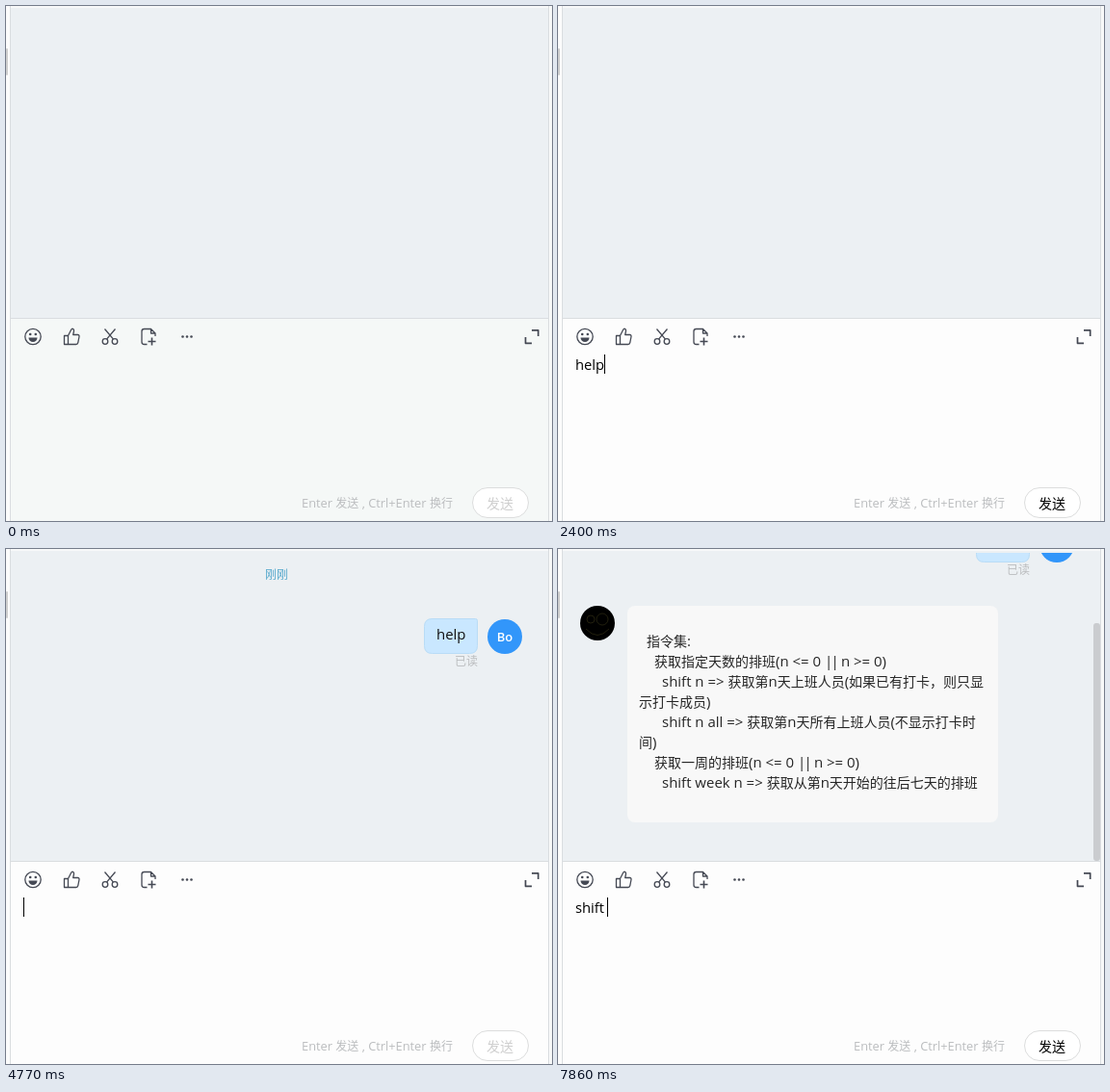
Recreate the animation shown at these times as an HTML page. Size 567 by 535 pixels, loop 8 s.

```html
<!DOCTYPE html>
<html lang="zh-CN">
<head>
<meta charset="utf-8">
<title>Chat</title>
<style>
html, body { margin: 0; width: 100%; height: 100%; overflow: hidden; background: #f8f9f9; }
svg { display: block; width: 567px; height: 535px; }
text { font: 14px "Open Sans", "Noto Sans CJK SC", "Noto Sans CJK", sans-serif; white-space: pre; fill: #111; }
.latin { font-size: 1.07em; }
#input .latin { font-size: 1.055em; }
#reply text { fill: #262626; }
.bars { letter-spacing: -1.7px; }
.small { font-size: 12px; fill: #bbbdbf; }
.icons { fill: none; stroke: #454954; stroke-width: 1.3; stroke-linejoin: round; }
.icons .solid { fill: #454954; stroke: none; }
</style>
</head>
<body>
<svg viewBox="0 0 567 535">
  <defs><clipPath id="view"><rect x="5" y="4" width="558" height="320"/></clipPath></defs>

  <rect width="4" height="535" fill="#fcfcfc"/>
  <rect y="44" width="2" height="28" rx="1" fill="#cfcfcf"/>
  <rect x="5" y="2" width="558" height="322" fill="#ecf0f3"/>
  <rect id="editor" x="5" y="325" width="558" height="210"/>
  <path d="M4.5 0V535M563.5 0V535M5 324.5H563" fill="none" stroke="#dadde0"/>

  <g clip-path="url(#view)">
    <g id="sent">
      <text class="small" x="269" y="31" style="fill:#55a8cc">刚刚</text>
      <path d="M442 72.5H487.5q2 0 2 2V100.5q0 8-8 8H442.5q-8 0-8-8V80.5q0-8 8-8z" fill="#c9e7ff" stroke="#b9dcf6"/>
      <text x="447" y="94" data-mixed>help</text>
      <circle cx="518" cy="91" r="18" fill="#3296fa"/>
      <text x="518" y="95.5" text-anchor="middle" style="font-size:13px;font-weight:600;fill:#fff">Bo</text>
      <text class="small" id="status" x="466" y="120.5"></text>
    </g>
    <g id="reply">
      <circle cx="41" cy="77" r="18" fill="#000"/>
      <g fill="none" stroke="#2a2812" stroke-width=".8">
        <circle cx="34" cy="73" r="4"/><circle cx="46" cy="73" r="6"/><path d="M29 83q12 13 24 0"/>
      </g>
      <rect x="72" y="59" width="385" height="225" rx="8" fill="#f8f8f8"/>
      <rect x="556" y="77" width="7" height="247" rx="3" fill="#cacccf"/>
    </g>
  </g>

  <g class="icons">
    <circle cx="28" cy="343.5" r="8.2"/>
    <path class="solid" d="M23.5 344.5h9a4.5 4.5 0 0 1-9 0z"/>
    <circle class="solid" cx="25.2" cy="341" r="1.3"/><circle class="solid" cx="30.8" cy="341" r="1.3"/>
    <path d="M60.5 342.5h4v9h-4zM64.5 342.5l3.2-6.3q.8-1.5 2.1-.6 1 .8.7 2.3l-.8 3.6h4.800q1.8.2 1.5 2l-1.2 6.2q-.3 1.8-2 1.8h-8.3"/>
    <path d="M102.5 335.5l9 10.7M113.5 335.5l-9 10.7"/>
    <circle cx="103" cy="348.5" r="2.8"/><circle cx="113" cy="348.5" r="2.8"/>
    <path d="M146.5 351.5h-3q-2.5 0-2.5-2.5v-11q0-2.5 2.5-2.5h7l4.5 4.5v3M150.5 335.5v4.5h4.5"/>
    <path d="M147.5 348.5h8M151.5 344.5v8" stroke-width="1.6"/>
    <circle class="solid" cx="183.5" cy="343.5" r="1.3"/><circle class="solid" cx="188" cy="343.5" r="1.3"/><circle class="solid" cx="192.5" cy="343.5" r="1.3"/>
    <path d="M546 336.8h6.7v6.2M539.5 344v6.3h6.5" stroke-width="1.7"/>
  </g>

  <text id="input" x="18" y="378" style="fill:#000"></text>
  <rect id="caret" y="362" width="1" height="20"/>
  <text class="small" x="307" y="520.5" data-mixed>Enter 发送 , Ctrl+Enter 换行</text>
  <rect x="484.5" y="500.5" width="58" height="31" rx="15.5" fill="#fff" stroke="#dcdddd"/>
  <text id="send" x="499" y="522">发送</text>
</svg>
<script>
const LOOP = 8000;
const $ = id => document.getElementById(id);
const NS = 'http://www.w3.org/2000/svg';

// Latin runs are set slightly larger than the Chinese around them.
function setText(el, str) {
  el.textContent = '';
  for (const run of str.match(/\|\||[\x20-\x7b\x7d\x7e]+|[^\x20-\x7e]+/g) || []) {
    const span = document.createElementNS(NS, 'tspan');
    span.textContent = run;
    if (run.charCodeAt(0) < 127) span.classList.add('latin');
    if (run === '||') span.classList.add('bars');
    el.append(span);
  }
}

document.querySelectorAll('[data-mixed]').forEach(el => setText(el, el.textContent));

[
  [92, '指令集:'],
  [100, '获取指定天数的排班(n <= 0 || n >= 0)'],
  [108, 'shift n => 获取第n天上班人员(如果已有打卡，则只显'],
  [84, '示打卡成员)'],
  [108, 'shift n all => 获取第n天所有上班人员(不显示打卡时'],
  [84, '间)'],
  [100, '获取一周的排班(n <= 0 || n >= 0)'],
  [108, 'shift week n => 获取从第n天开始的往后七天的排班']
].forEach(([x, str], i) => {
  const line = document.createElementNS(NS, 'text');
  line.setAttribute('x', x);
  line.setAttribute('y', 101 + 21 * i);
  setText(line, str);
  $('reply').append(line);
});

const words = [
  { text: 'help', keys: [2010, 2130, 2220, 2400], end: 2610 },
  { text: 'shift ', keys: [7200, 7320, 7380, 7560, 7710, 7860], end: LOOP }
];

function typedAt(t) {
  const word = words.find(w => t >= w.keys[0] && t < w.end);
  return word ? word.text.slice(0, word.keys.filter(k => k <= t).length) : '';
}

const show = (id, on) => $(id).setAttribute('visibility', on ? 'visible' : 'hidden');
let shown = null;

function draw(t) {
  const typed = typedAt(t);
  if (typed !== shown) {
    setText($('input'), typed);
    const width = typed ? $('input').getComputedTextLength() : 0;
    $('caret').setAttribute('x', Math.floor(18 + width));
    shown = typed;
  }
  $('send').style.fill = typed ? '#000' : '#cfcfcf';

  const focused = t >= 720;
  $('editor').setAttribute('fill', focused ? '#fdfdfd' : '#f5f8f7');
  show('caret', focused);

  const replied = t >= 5100;
  show('sent', t >= 4560);
  show('reply', replied);
  $('sent').setAttribute('transform', `translate(0 ${replied ? -95 : 0})`);
  $('status').textContent = t < 4680 ? '' : t < 4770 ? '未读' : '已读';
  $('status').style.fill = t < 4770 ? '#3296fa' : '#bbbdbf';
}

const start = performance.now();
function tick() {
  draw((performance.now() - start) % LOOP);
  requestAnimationFrame(tick);
}
tick();
</script>
</body>
</html>
```
